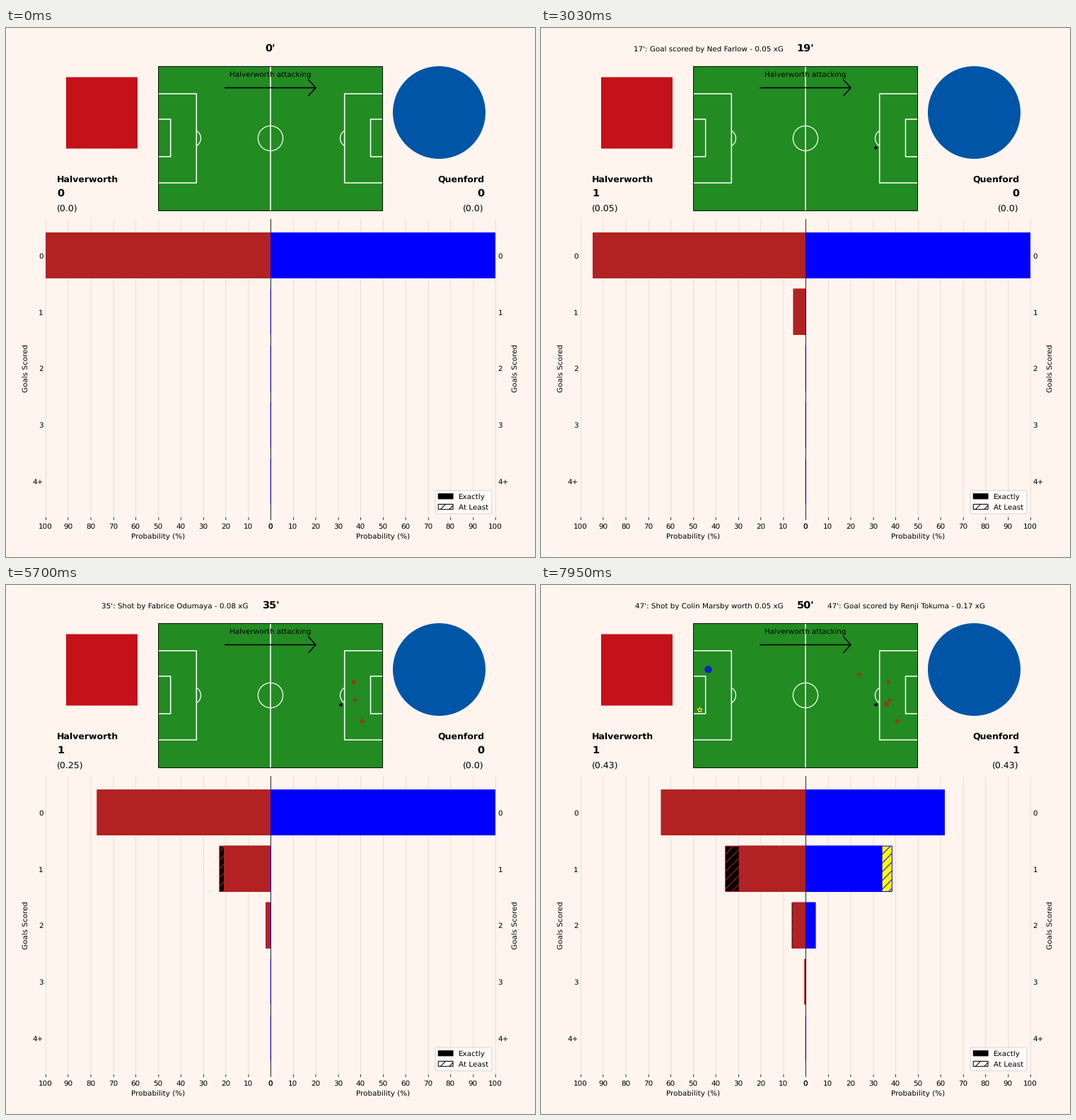
Recreate the animation shown at these times as a matplotlib script. Size 748 px wide and 748 px high, loop 8 s.

```python
import numpy as np
import matplotlib.pyplot as plt
from matplotlib.animation import FuncAnimation
from matplotlib.collections import LineCollection
from matplotlib.patches import Arc, Circle, Patch, Rectangle

SIZE, LOOP, STEP = 748, 8000, 20
MINUTE_MS, SUB_MS, SUBS = 160, 30, 5

HOME, AWAY = "Halverworth", "Quenford"
MAIN = ("firebrick", "blue")
SECOND = ("black", "yellow")

# minute, side, x, y, xG, goal, description
SHOTS = [
    (17, 0, 473.5, 168.5, 0.053, True, "Goal scored by Ned Farlow - 0.05 xG"),
    (25, 0, 491.5, 137, 0.067, False, "Shot by Ned Farlow - 0.07 xG"),
    (25, 0, 493, 162, 0.05, False, "Shot by Maridelso - 0.05 xG"),
    (35, 0, 503, 192, 0.08, False, "Shot by Fabrice Odumaya - 0.08 xG"),
    (39, 1, 236, 119, 0.259, False, "Shot by Dembaro Jolleh - 0.26 xG"),
    (47, 0, 488.5, 168, 0.126, False, "Shot by Fabrice Odumaya - 0.13 xG"),
    (47, 0, 450.5, 126, 0.05, False, "Shot by Colin Marsby worth 0.05 xG"),
    (47, 1, 224, 175.5, 0.167, True, "Goal scored by Renji Tokuma - 0.17 xG"),
]

# Chart geometry in pixels
MID, SPAN = 374, 317.9
TOP, BOTTOM = 270.5, 692.1
ROW0, PITCH = 321.88, 79.85
BAR_H = 0.8 * PITCH
UNIT = SIZE / 1000

plt.rcParams.update({"path.snap": False, "text.hinting": "none"})
fig = plt.figure(figsize=(10, 10), dpi=74.8, facecolor="seashell")
ax = fig.add_axes([0, 0, 1, 1])
ax.set(xlim=(0, SIZE), ylim=(SIZE, 0))
ax.autoscale(False)
ax.axis("off")


def fit(x):
    """Centre a stroke on a cell of the 1000-unit layout grid."""
    return (np.floor(x / UNIT + 0.5) + 0.5) * UNIT


def fit_y(y):
    return SIZE - fit(SIZE - y)


def label(x, y, text="", size=10, ha="center", **kw):
    return ax.text(x, y, text, fontsize=size, ha=ha, va="baseline", **kw)


def line(xs, ys, color, width, **kw):
    ax.plot(xs, ys, color=color, lw=width, **kw)


def box(x0, y0, x1, y1, **kw):
    return ax.add_patch(Rectangle((x0, y0), x1 - x0, y1 - y0, **kw))


def draw_pitch():
    left, top, right, bottom = 215.6, 54.4, 532.6, 258.4
    box(left, top, right, bottom, fc="forestgreen", lw=0, zorder=1)
    box(left, top, right, bottom, fill=False, ec="black", lw=0.9, zorder=3)
    for goal, area, small in ((left, 269.3, 232.7), (right, 478.7, 515.5)):
        line([goal, area, area, goal], [93, 93, 219, 219], "white", 1.5, zorder=2)
        line([goal, small, small, goal], [129, 129, 182, 182], "white", 1.5, zorder=2)
    line([MID, MID], [top, bottom], "white", 1.6, zorder=2)
    ax.add_patch(Circle((MID, 156), 17.6, fill=False, ec="white", lw=1.2, zorder=2))
    for x, turn in ((263, 0), (485, 180)):
        ax.add_patch(Arc((x, 156), 25, 25, angle=turn, theta1=-61, theta2=61,
                         color="white", lw=1.2, zorder=2))
    label(MID, 69, f"{HOME} attacking", zorder=4)
    line([310, 437.5], [84.5, 84.5], "black", 1.5, zorder=4)
    line([428, 438, 428], [73.5, 84.5, 95.5], "black", 1.5, zorder=4)


def draw_badges():
    box(85, 69.5, 186, 170.5, fc="#c4111a", lw=0)
    ax.add_patch(Circle((612.5, 119.5), 65.5, fc="#0055a6", lw=0))


def draw_chart():
    xs = fit(MID + SPAN * np.linspace(-1, 1, 21))
    ax.add_collection(LineCollection(
        [[(x, TOP), (x, BOTTOM)] for x in xs],
        colors="#b0b0b0", alpha=0.4, lw=0.8, zorder=0), autolim=False)
    ax.add_collection(LineCollection(
        [[(x, BOTTOM), (x, BOTTOM + 3.6)] for x in xs],
        colors="black", lw=0.8), autolim=False)
    line([fit(MID)] * 2, [TOP, BOTTOM], "black", 0.8, zorder=5)

    for side in (-1, 1):
        for pct in range(0, 101, 10):
            label(MID + side * SPAN * pct / 100, 707.5, str(pct))
        label(MID + side * SPAN / 2, 721.7, "Probability (%)")
        edge = MID + side * SPAN
        ha = "right" if side < 0 else "left"
        for row, name in enumerate(("0", "1", "2", "3", "4+")):
            label(edge + side * 3.6, ROW0 + row * PITCH + 3.8, name, ha=ha)
        ax.text(edge + side * 23.1, (TOP + BOTTOM) / 2, "Goals Scored",
                rotation=90, ha=ha, va="center")

    ax.legend(handles=[Patch(fc="black", ec="black", label="Exactly"),
                       Patch(fc="white", ec="black", hatch="//", label="At Least")],
              loc="lower right", bbox_to_anchor=(MID + SPAN, BOTTOM),
              bbox_transform=ax.transData)


def make_bars(side):
    """Hatched 'at least' bars below solid 'exactly' bars."""
    half = Rectangle((MID - SPAN * (1 - side), TOP), SPAN, BOTTOM - TOP,
                     transform=ax.transData)
    level = 3 + 3 * side  # the centre line lies between both sides
    styles = (dict(fc=SECOND[side], hatch="//", zorder=level),
              dict(fc=MAIN[side], zorder=level + 1))
    groups = []
    for style in styles:
        bars = []
        for row in range(5):
            y = ROW0 + row * PITCH
            bar = box(MID, fit_y(y - BAR_H / 2), MID, fit_y(y + BAR_H / 2),
                      ec=MAIN[side], lw=1, **style)
            bar.set_clip_path(half)
            bars.append(bar)
        groups.append(bars)
    return groups


def make_marker(shot):
    _, side, x, y, xg, goal, _ = shot
    if goal:
        style = dict(marker="*", fc=MAIN[side], ec=SECOND[side], lw=1)
    else:
        style = dict(marker="o", color=MAIN[side], alpha=0.72, lw=1)
    return ax.scatter(x, y, s=300 * xg, zorder=3, **style)


def goal_odds(side, minute):
    """Rows: P(at least n) and P(exactly n) for n = 0..4+."""
    dist = np.array([1.0, 0, 0, 0, 0])
    for m, s, _, _, xg, *_ in SHOTS:
        if s == side and m <= minute:
            scored = np.append(0, dist[:4] * xg)
            scored[4] += dist[4] * xg
            dist = dist * (1 - xg) + scored
    least = dist[::-1].cumsum()[::-1]
    least[0] = dist[0]
    return np.array([least, dist])


def make_timeline():
    busy = {shot[0] for shot in SHOTS}
    starts, states, t, minute = [], [], 0, 0
    while t < LOOP:
        for sub in range(SUBS if minute in busy else 1):
            starts.append(t)
            states.append((minute, sub))
            t += SUB_MS if minute in busy else MINUTE_MS
        minute += 1
    return starts, states


draw_pitch()
draw_badges()
draw_chart()

clock = label(MID, 33.2, size=14, weight="bold")
bars, news, scores, totals = [], [], [], []
for side, (name, x, ha) in enumerate(((HOME, 72, "left"), (AWAY, 676, "right"))):
    label(x, 217.6, name, 12, ha, weight="bold")
    scores.append(label(x, 238.2, size=14, ha=ha, weight="bold"))
    totals.append(label(x, 258, size=12, ha=ha))
    news.append(label((342.5, 405.3)[side], 33.2, ha=("right", "left")[side]))
    bars.append(make_bars(side))
markers = [make_marker(shot) for shot in SHOTS]
STARTS, STATES = make_timeline()


def update(i):
    now = i * STEP + STEP / 2
    minute, sub = STATES[np.searchsorted(STARTS, now, side="right") - 1]
    clock.set_text(f"{minute}'")

    for side in (0, 1):
        done = [s for s in SHOTS if s[1] == side and s[0] <= minute]
        scores[side].set_text(str(sum(s[5] for s in done)))
        totals[side].set_text(f"({round(float(sum(s[4] for s in done)), 2)})"
                              if done else "(0.0)")
        news[side].set_text(f"{done[-1][0]}': {done[-1][6]}" if done else "")

        before, after = goal_odds(side, minute - 1), goal_odds(side, minute)
        odds = before + (after - before) * (sub + 1) / SUBS
        sign = 1 if side else -1
        for group, probs in zip(bars[side], odds):
            for bar, p in zip(group, probs):
                bar.set_x(fit(MID))
                bar.set_width(fit(MID + sign * SPAN * p) - fit(MID))

    # Shots of the same minute and team appear one after another
    seen = {}
    for shot, marker in zip(SHOTS, markers):
        key = shot[:2]
        order = seen.get(key, 0)
        seen[key] = order + 1
        marker.set_visible(shot[0] < minute or (shot[0] == minute and order <= sub))
    return []


anim = FuncAnimation(fig, update, frames=LOOP // STEP, interval=STEP,
                     init_func=lambda: update(0), repeat=True, repeat_delay=0)
plt.show()
```
